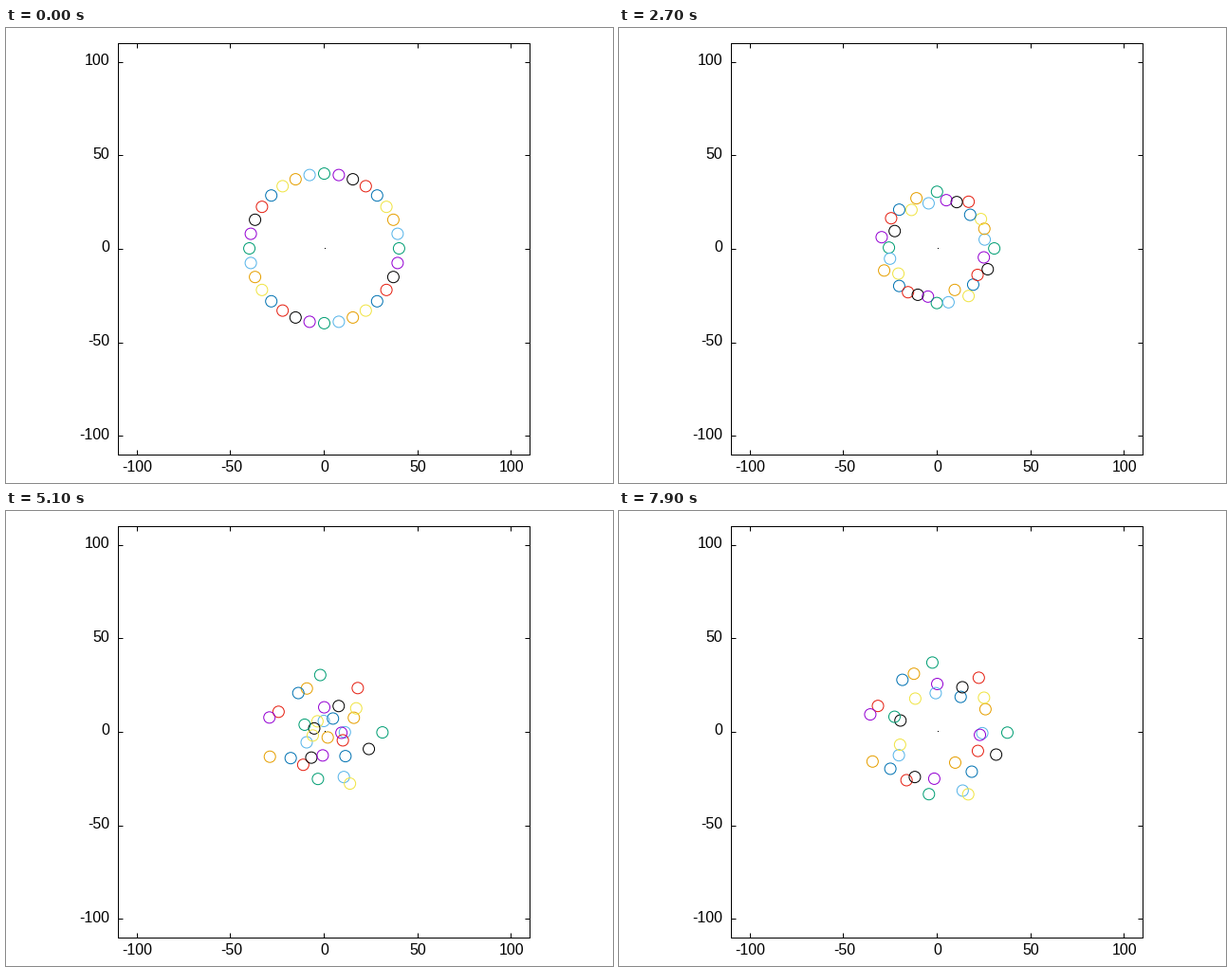
A matplotlib script that plays this animation: 640x480 px, repeating every 8 s.

```python
import numpy as np
import matplotlib.pyplot as plt
from matplotlib.animation import FuncAnimation
from matplotlib.patches import Circle
from matplotlib.transforms import Affine2D

DPI = 100
PX = 72 / DPI             # one pixel in points
SPAN = 110
SCALE = 434 / (2 * SPAN)  # pixels per data unit
N = 32
R = 40 * SCALE
MEAN = 45                 # typical reach in pixels
FRAMES, STEP = 80, 100

COLORS = ["#009E73", "#56B4E9", "#E69F00", "#F0E442",
          "#0072B2", "#E51E10", "#000000", "#9400D3"]

# Distance from the centre at which each ring is first slowed by the others
reach = np.array([58, 36, 43, 47, 33, 56, 41, 38, 57, 30, 51, 31, 51, 53, 30, 57,
                  36, 36, 59, 31, 49, 47, 41, 38, 52, 53, 28, 58, 43, 36, 52, 34])
angle = 2 * np.pi * np.arange(N) / N

# Rings that dive deep swing towards the roomier side, the others away from it
lean = np.roll(reach, -1) - np.roll(reach, 1)
swing = np.radians(0.1 * lean * np.clip(MEAN - reach, -5, 15))

# Key times: mean radius, how strongly reach spreads the radii, part of swing
times = np.array([0, 1.2, 2.7, 3.5, 5.1, 6.3, 7.9])
keys = np.array([[R, 72.1, 54.7, MEAN, 38, 48.6, 58.4],
                 [0, 0.08, 0.42, 1, 1.8, 1.27, 1.2],
                 [0, 0, 0.05, 0.25, 1, 1, 1]]).T
slopes = np.gradient(keys, times, axis=0, edge_order=2)
slopes[0] = 0


def ease(t):
    """Cubic Hermite curve through the keys."""
    i = min(np.searchsorted(times, t, side="right") - 1, len(times) - 2)
    h = times[i + 1] - times[i]
    u = (t - times[i]) / h
    return ((1 + 2 * u) * (1 - u) ** 2 * keys[i]
            + u * (1 - u) ** 2 * h * slopes[i]
            + u * u * (3 - 2 * u) * keys[i + 1]
            + u * u * (u - 1) * h * slopes[i + 1])


def positions(t):
    mean, gain, turn = ease(t)
    radius = (mean + gain * (reach - MEAN)) / SCALE
    a = angle + turn * swing
    return radius * np.cos(a), radius * np.sin(a)


plt.rcParams["font.family"] = "Liberation Sans"
fig = plt.figure(figsize=(6.4, 4.8), dpi=DPI, facecolor="white")
ax = fig.add_axes([118 / 640, 30 / 480, 434 / 640, 434 / 480])
ax.set(xlim=(-SPAN, SPAN), ylim=(-SPAN, SPAN))

ticks = range(-100, 101, 50)
ax.set_xticks(ticks)
ax.set_yticks(ticks)
ax.tick_params(direction="in", top=True, right=True, length=5 * PX,
               width=PX, labelbottom=False, labelleft=False)
for spine in ax.spines.values():
    spine.set_linewidth(PX)


def label(v, xy, dx, dy, ha):
    ax.annotate(str(v), xy, (dx * PX, dy * PX), textcoords="offset points",
                ha=ha, va="baseline", fontsize=16 * PX)


for v in ticks:
    label(v, (v, -SPAN), 1, -18.5, "center")
    label(v, (-SPAN, v), -8.5, -3.5, "right")

# Half a pixel over, onto pixel centres like the snapped axes
centred = ax.transData + Affine2D().translate(0.5, 0.5)
ax.plot([0], [0], ",", color="black", transform=centred)
rings = [ax.add_patch(Circle((0, 0), 6 / SCALE, fill=False, lw=PX, zorder=3,
                             ec=COLORS[k % 8], transform=centred))
         for k in range(N)]


def update(frame):
    for ring, x, y in zip(rings, *positions(frame * STEP / 1000)):
        ring.center = x, y
    return rings


anim = FuncAnimation(fig, update, frames=FRAMES, interval=STEP,
                     repeat=True, repeat_delay=0)
plt.show()
```
